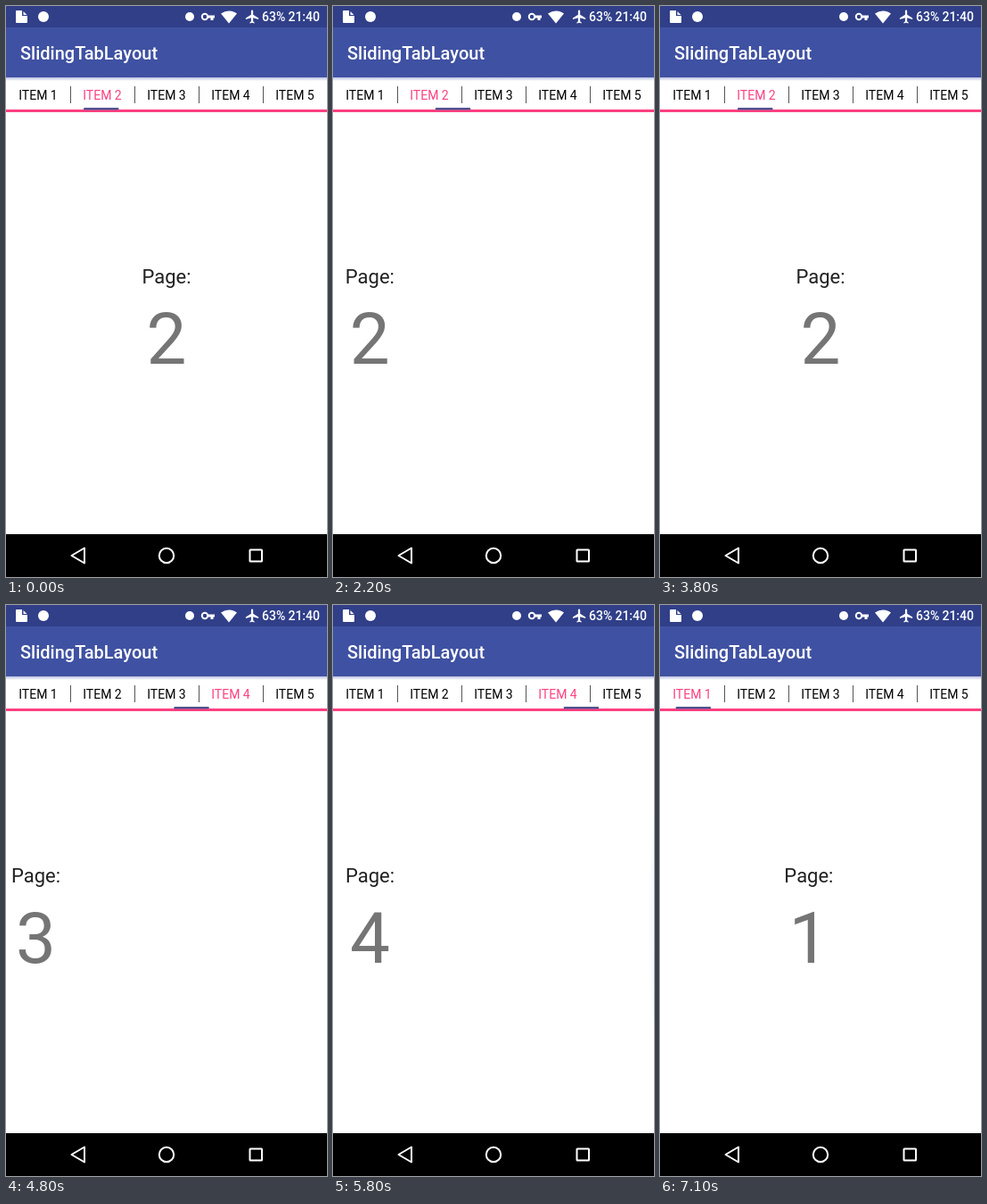
Recreate the animation shown at these times as an HTML page. Size 360 by 640 pixels, loop 7.2 s.

```html
<!DOCTYPE html>
<html lang="en">
<head>
<meta charset="utf-8">
<title>Sliding tabs</title>
<style>
  html, body { margin: 0; width: 100%; height: 100%; overflow: hidden; background: #fff; }
  svg { display: block; font-family: Roboto, sans-serif; }
  .mid { text-anchor: middle; }
  .line { fill: none; stroke: #fff; stroke-width: 2; }
  #tabs { font-size: 14px; }
</style>
</head>
<body>
<svg width="360" height="640">
  <defs>
    <linearGradient id="shade" x2="0" y2="1">
      <stop stop-color="#b9c0e0"/>
      <stop offset="1" stop-color="#fff"/>
    </linearGradient>
  </defs>

  <svg y="120" width="360" height="472" viewBox="0 120 360 472">
    <g id="pages" class="mid"></g>
    <circle id="glow" cy="356" r="1368" fill="#bfcbff"/>
  </svg>

  <rect width="360" height="24" fill="#303f88"/>
  <rect y="24" width="360" height="56" fill="#3f51a2"/>
  <text x="16" y="60" font-size="20" font-weight="500" fill="#fff">SlidingTabLayout</text>

  <g fill="#fff" font-size="14" font-weight="500">
    <path d="M12 5h6v6h6v7q0 1-1 1H12q-1 0-1-1V6q0-1 1-1zM19.500 6l4 4h-4z"/>
    <circle cx="42" cy="12" r="6"/>
    <circle cx="206" cy="12" r="5"/>
    <circle cx="223" cy="12" r="3.2" class="line"/>
    <path d="M226 10.600h8v3h-1.500v2.400h-3v-2.400H226z"/>
    <path d="M241 8.500Q250 2.500 259 8.500L250 19.500z"/>
    <path transform="translate(267.400 3) scale(.75)"
      d="M21 16v-2l-8-5V3.500a1.500 1.500 0 0 0-3 0V9l-8 5v2l8-2.500V19l-2 1.500V22l3.500-1 3.500 1v-1.500L13 19v-5.500z"/>
    <text x="287" y="17">63%</text>
    <text x="352" y="17" text-anchor="end">21:40</text>
  </g>

  <rect y="80" width="360" height="4" fill="url(#shade)"/>
  <g id="tabs" class="mid"></g>
  <rect y="116" width="360" height="3" fill="#ff4081"/>
  <rect id="marker" y="114" width="39.500" height="2.500" rx="1" fill="#505590"/>

  <rect y="592" width="360" height="48" fill="#000"/>
  <g class="line">
    <path d="M88 607.500V624.500L73.500 616z" stroke-linejoin="round"/>
    <circle cx="180" cy="616" r="8.200"/>
    <rect x="273.500" y="609.500" width="13.500" height="13" rx=".5"/>
  </g>
</svg>

<script>
const LOOP = 7200, STEP = 100, WIDTH = 360, TAB = 72;
const $ = id => document.getElementById(id);
const clamp = x => Math.min(1, Math.max(0, x));
const smooth = x => (x = clamp(x), x * x * (3 - 2 * x));

for (let i = 0; i < 5; i++) {
  const x = i * WIDTH + 180;
  $('pages').innerHTML +=
    `<text x="${x}" y="311" font-size="22" fill="#212121">Page:</text>
     <text x="${x}" y="401" font-size="80" fill="#757575">${i + 1}</text>`;
  $('tabs').innerHTML += `<text x="${i * TAB + 36}" y="105">ITEM ${i + 1}</text>` +
    (i ? `<rect x="${i * TAB}" y="90" width="1" height="19" fill="#555"/>` : '');
}
const labels = $('tabs').querySelectorAll('text');

// Page flings: three forward, then four back
const flings = [];
for (let i = 0; i < 3; i++) flings.push({ start: 4340 + i * 320, span: 320, dir: 1 });
for (let i = 0; i < 4; i++) flings.push({ start: 5573 + i * 393, span: 393, dir: -1 });

// Slow drag towards the next page and back
const drag = t => 0.443 * Math.sin(Math.PI * clamp((t - 1300) / 2500)) ** 1.4;

// Overscroll glow at the last page
const glowAt = t => t < 5400 ? smooth((t - 5250) / 150) : 1 - smooth((t - 5400) / 500);

function draw(t) {
  let position = 1 + drag(t), selected = 1;
  for (const { start, span, dir } of flings) {
    const u = (t - start) / span;
    position += dir * smooth(u);
    if (u > 0.4) selected += dir;
  }
  $('pages').setAttribute('transform', `translate(${-position * WIDTH})`);
  $('marker').setAttribute('x', 15 + position * TAB);
  labels.forEach((label, i) => label.setAttribute('fill', i === selected ? '#ff4081' : '#000'));

  const glow = glowAt(t);
  $('glow').setAttribute('cx', WIDTH + 1368 - 48 * glow);
  $('glow').setAttribute('opacity', glow);
}

const begin = performance.now();
function tick() {
  const t = (performance.now() - begin) % LOOP;
  draw(Math.floor(t / STEP) * STEP);
  requestAnimationFrame(tick);
}
tick();
</script>
</body>
</html>
```
